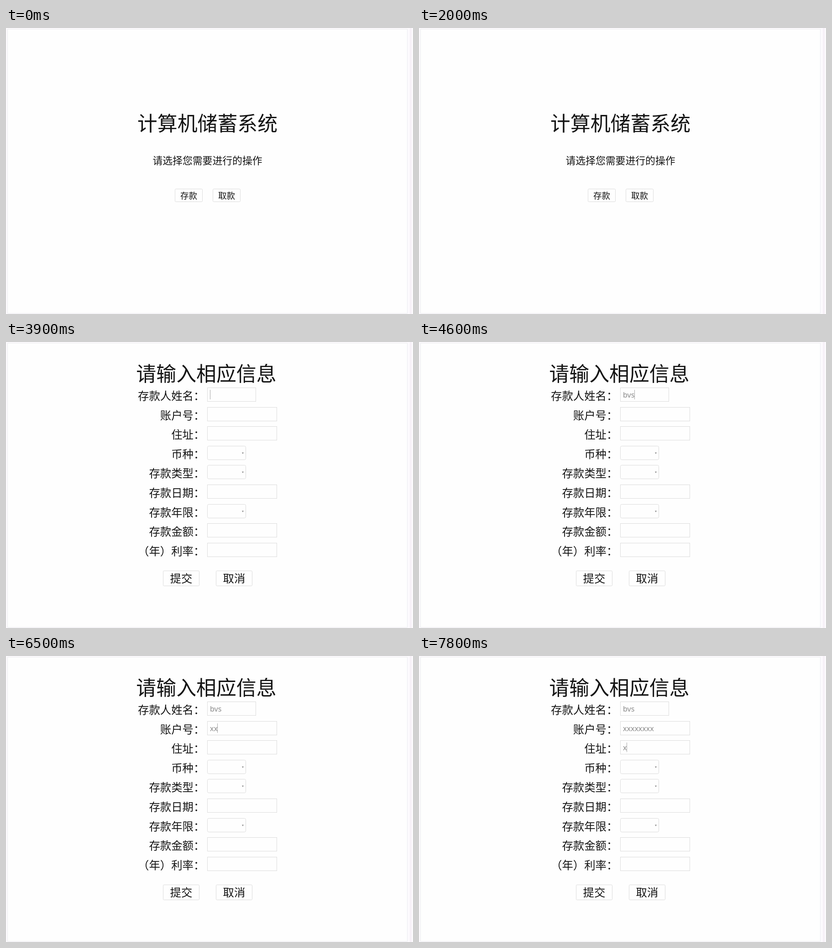
These frames come from a looping animation (892x628 px, 8000 ms). An HTML page:

```html
<!DOCTYPE html>
<html lang="zh-CN">
<head>
<meta charset="utf-8">
<title>计算机储蓄系统</title>
<style>
  html, body { margin: 0; width: 100%; height: 100%; overflow: hidden; background: #fefefe; }
  svg { display: block; width: 100vw; height: 100vh; }
  text { font: 350 24.4px "Noto Sans CJK SC", "Noto Sans CJK", sans-serif; fill: #141414; }
  .mid { text-anchor: middle; }
  .end { text-anchor: end; }
  .typed { font: 400 16px "Noto Sans", sans-serif; fill: #8a8a8a; }
  .box { fill: #fefefe; stroke: #dcdcdc; }
  .arrow { fill: #888; }
  .caret { fill: #a8a8a8; }
  .hidden { visibility: hidden; }
</style>
</head>
<body>
<svg viewBox="0 0 892 628">
  <rect width="892" height="628" fill="#fcfafd"/>
  <rect x="885" width="4" height="628" fill="#f7f1f8"/>
  <rect x="3.5" y="2.5" width="876" height="624" fill="#fefefe" stroke="#ececf0"/>
  <g id="menu"></g>
  <g id="form"></g>
</svg>
<script>
const LOOP = 8000, BLINK = 500, FRAME = 100;
const EM = 24.4, TITLE = EM * 1.8;
const FIELD_X = 441.5, TEXT_X = 447, MIDDLE = 441.5;
const menu = document.getElementById('menu');
const form = document.getElementById('form');

function add(parent, tag, attrs, content = '') {
  const node = document.createElementNS('http://www.w3.org/2000/svg', tag);
  for (const key in attrs) node.setAttribute(key, attrs[key]);
  node.textContent = content;
  return parent.appendChild(node);
}

// Text centred vertically on y
function label(parent, x, y, size, content, align = 'mid') {
  add(parent, 'text', { x, y: y + size * 0.385, class: align, style: `font-size:${size}px` }, content);
}

function box(parent, x, y, width, height, rx = 0) {
  add(parent, 'rect', { x, y, width, height, rx, class: 'box' });
}

function button(parent, x, y, size, content) {
  const width = Math.round(size * 3.25), height = Math.round(size * 0.85 + 12);
  box(parent, x, y, width, height, 2);
  label(parent, x + width / 2, y + height / 2, size, content);
}

const rowTop = i => Math.floor(100.5 + i * 42.6) + 0.5;

label(menu, MIDDLE, 209, TITLE, '计算机储蓄系统');
label(menu, MIDDLE, 291, EM * 0.895, '请选择您需要进行的操作');
button(menu, 370.5, 353.5, EM * 0.76, '存款');
button(menu, 453.5, 353.5, EM * 0.76, '取款');

label(form, 439, 69, TITLE, '请输入相应信息');
'存款人姓名 账户号 住址 币种 存款类型 存款日期 存款年限 存款金额 （年）利率'.split(' ').forEach((name, i) => {
  const y = rowTop(i);
  const isSelect = /币种|类型|年限/.test(name);
  const width = isSelect ? 84 : name.includes('姓名') ? 106 : 152;
  label(form, 435.4, y + 16.8, EM, name + '：', 'end');
  box(form, FIELD_X, y, width, 30, isSelect ? 3 : 0);
  if (isSelect) add(form, 'path', { d: `M517 ${y + 14}h4l-2 3.5z`, class: 'arrow' });
});
button(form, 344.5, 502.5, EM, '提交');
button(form, 460.5, 502.5, EM, '取消');

// Each field is clicked at focus, gets its first letter at start,
// then after a pause the rest at one letter per repeat ms
const fields = [
  { value: 'bvs', focus: 3700, start: 4400, pause: 200, repeat: 0 },
  { value: 'xxxxxxxx', focus: 5200, start: 6100, pause: 400, repeat: 33 },
  { value: 'x', focus: 7500, start: 7800 }
];
fields.forEach((field, i) => {
  field.node = add(form, 'text', { x: TEXT_X, y: rowTop(i) + 21.5, class: 'typed' });
  field.keys = [...field.value].map((_, k) => k === 0 ? field.start
    : field.start + field.pause + Math.ceil((k - 1) * field.repeat / FRAME) * FRAME);
});
const caret = add(form, 'rect', { width: 1, height: 21, class: 'caret' });

function setVisible(node, visible) {
  node.classList.toggle('hidden', !visible);
}

function draw(time) {
  const formShown = time >= 3000 || time >= 1100 && time < 2000;
  setVisible(menu, !formShown);
  setVisible(form, formShown);

  for (const field of fields) {
    field.count = field.keys.filter(key => key <= time).length;
    field.node.textContent = field.value.slice(0, field.count);
  }

  // The caret blinks, starting anew with each click or key
  const row = fields.findLastIndex(field => field.focus <= time);
  const active = fields[row];
  const lastInput = active && (active.keys[active.count - 1] ?? active.focus);
  const lit = active && (time - lastInput) % (2 * BLINK) < BLINK;
  setVisible(caret, lit);
  if (lit) {
    const width = active.count ? active.node.getComputedTextLength() : 0;
    caret.setAttribute('x', Math.floor(TEXT_X + width));
    caret.setAttribute('y', rowTop(row) + 4.5);
  }
}

function tick() {
  draw(performance.now() % LOOP);
  requestAnimationFrame(tick);
}
tick();
</script>
</body>
</html>
```
